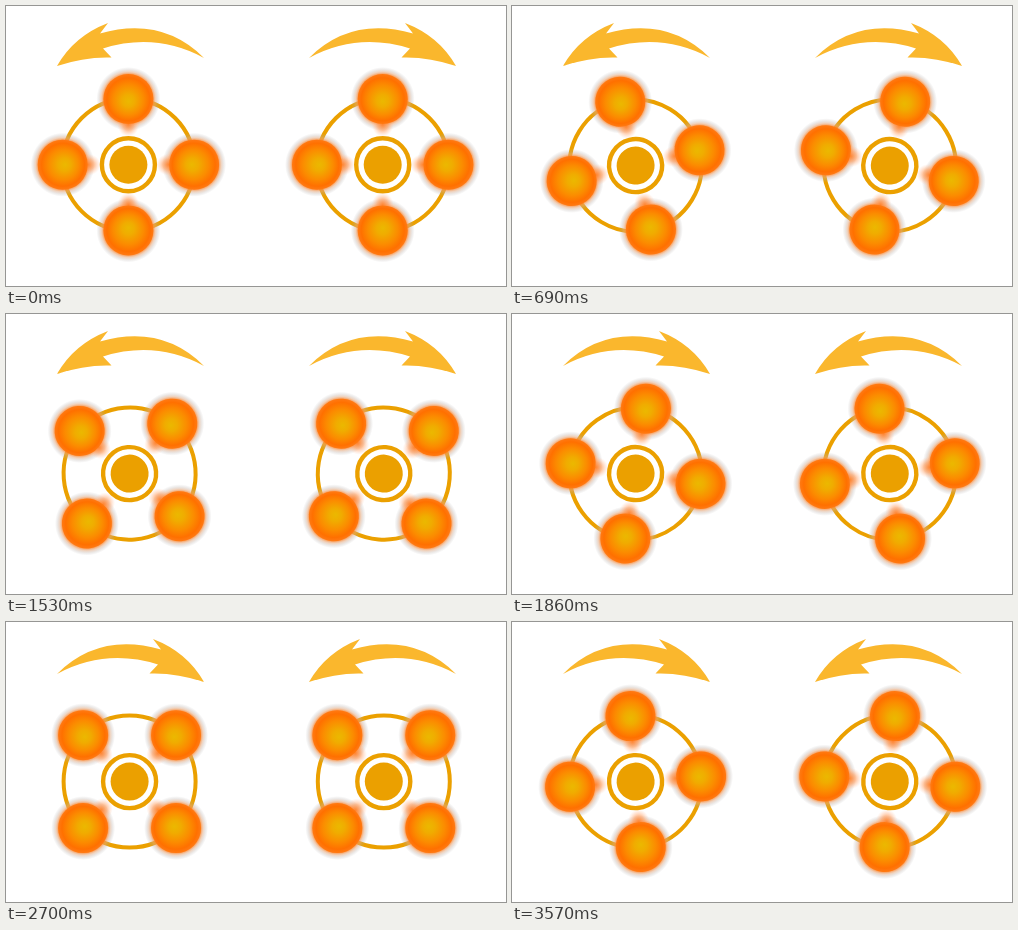
These frames come from a looping animation (500 by 280 pixels, 3600 ms). An HTML page:

```html
<!DOCTYPE html>
<html lang="en">
<head>
<meta charset="utf-8">
<title>Counter-rotating wheels</title>
<style>
  html, body { margin: 0; width: 100%; height: 100%; overflow: hidden; background: #fff; }
  svg { display: block; width: 500px; height: 280px; }
</style>
</head>
<body>
<svg viewBox="0 0 500 280">
  <defs>
    <radialGradient id="glow" fy=".55">
      <stop offset="0" stop-color="#ebb800"/>
      <stop offset=".25" stop-color="#f0ac00"/>
      <stop offset=".6" stop-color="#fb8c00"/>
      <stop offset=".86" stop-color="#ff7000"/>
      <stop offset="1" stop-color="#ff7a14"/>
    </radialGradient>
    <radialGradient id="halo">
      <stop offset=".76" stop-color="#ff8428" stop-opacity=".9"/>
      <stop offset=".85" stop-color="#e0a880" stop-opacity=".5"/>
      <stop offset=".93" stop-color="#b0a8a4" stop-opacity=".22"/>
      <stop offset="1" stop-color="#b0a8a4" stop-opacity="0"/>
    </radialGradient>
    <radialGradient id="tail">
      <stop offset="0" stop-color="#ff8430"/>
      <stop offset=".5" stop-color="#ff9a58" stop-opacity=".6"/>
      <stop offset="1" stop-color="#ffc0a0" stop-opacity="0"/>
    </radialGradient>
    <g id="ball">
      <circle r="32" fill="url(#halo)"/>
      <ellipse cy="25" rx="11" ry="13" fill="url(#tail)"/>
      <circle r="25" fill="url(#glow)"/>
    </g>
    <g id="wheel">
      <g fill="none" stroke="#eba000">
        <circle r="66" stroke-width="4"/>
        <circle r="26.5" stroke-width="4.4"/>
      </g>
      <circle r="19" fill="#eba000"/>
      <use href="#ball" transform="translate(0 -65.7)"/>
      <use href="#ball" transform="rotate(90) translate(0 -65.7)"/>
      <use href="#ball" transform="rotate(180) translate(0 -65.7)"/>
      <use href="#ball" transform="rotate(270) translate(0 -65.7)"/>
    </g>
    <path id="arrow" fill="#fab72d"
      d="M51 60Q68 30 102 17L94 27.5Q156 10 198 52Q150 26 97 42.5L105.5 51.5Q79 50.5 51 60Z"/>
  </defs>
  <use id="arrowL" href="#arrow"/>
  <use id="arrowR" href="#arrow"/>
  <use id="wheelL" href="#wheel"/>
  <use id="wheelR" href="#wheel"/>
</svg>
<script>
const STEP = 30, FRAMES = 120, HALF = 60, TURN = 4.5;
const place = (id, t) => document.getElementById(id).setAttribute('transform', t);
const spin = (id, x, y, a) => place(id, `translate(${x} ${y}) rotate(${a})`);

function draw(ms) {
  const n = Math.floor(ms / STEP) % FRAMES;
  const back = n >= HALF;
  const angle = (back ? n - HALF : n) * TURN;

  // The hub dips slightly near each quarter turn of the first half.
  const off = Math.min(angle % 90, 90 - angle % 90);
  const dip = back ? 0 : Math.max(0, 1 - off / 9);
  const dir = back ? 1 : -1;
  const y = 159.6 - 0.9 * dip;
  spin('wheelL', 123.6 - 1.2 * dip, y, dir * angle);
  spin('wheelR', 377.8 - 1.1 * dip, y, -dir * angle);

  place('arrowL', back ? 'matrix(-1 0 0 1 249 0)' : '');
  place('arrowR', back ? 'translate(252 0)' : 'matrix(-1 0 0 1 501 0)');
}

const start = performance.now();
function tick() {
  draw(performance.now() - start);
  requestAnimationFrame(tick);
}
tick();
</script>
</body>
</html>
```
